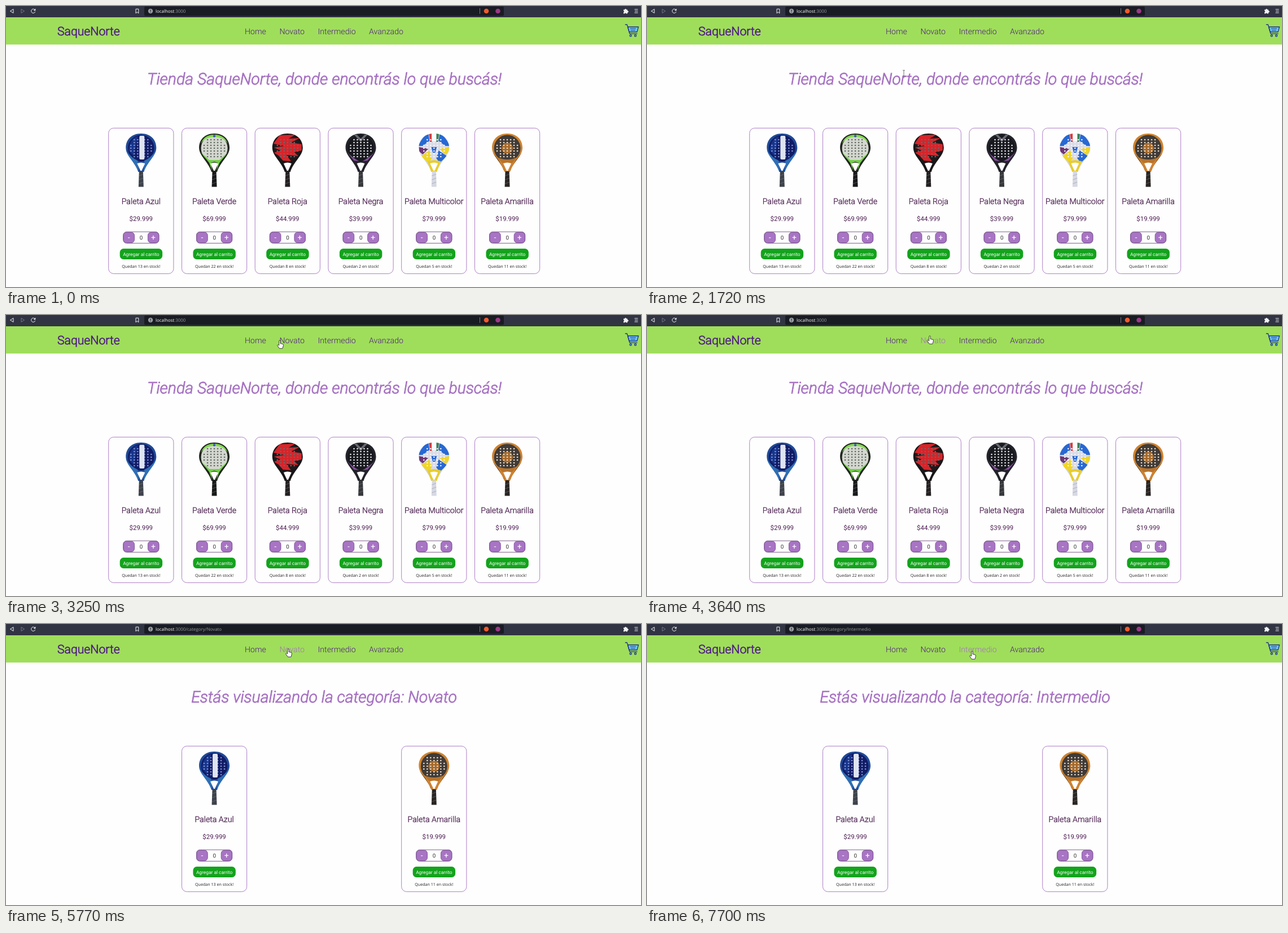
Recreate the animation shown at these times as an HTML page. Size 1125 by 498 pixels, loop 8 s.

```html
<!DOCTYPE html>
<html lang="es">
<head>
<meta charset="utf-8">
<title>Tienda</title>
<style>
html, body { margin: 0; width: 100%; height: 100%; overflow: hidden; background: #fefefe; }
svg { display: block; width: 1125px; height: 498px; font-family: Roboto, sans-serif; text-rendering: geometricPrecision; }
.mid { text-anchor: middle; }
.url { font: 7.9px "Open Sans", "Noto Sans", sans-serif; fill: #9a9ca3; }
.url tspan { fill: #fff; }
.logo { font-size: 21.2px; font-weight: 300; fill: #4f1a86; stroke: #4f1a86; stroke-width: .7; }
.nav { font-size: 14.2px; font-weight: 300; fill: #4f1a86; }
.title { font-size: 28.4px; font-weight: 300; font-style: italic; fill: #a671c2; stroke: #a671c2; stroke-width: .85; }
.name { font-size: 14.2px; font-weight: 300; fill: #441748; stroke: #441748; stroke-width: .3; }
.price { font-size: 11.4px; fill: #4b1b50; }
.qty { font-size: 9.8px; fill: #333; }
.sign { font-size: 14px; fill: #fff; }
.add { font-size: 8.4px; fill: #fff; }
.stock { font: 7.15px "Open Sans", "Noto Sans", sans-serif; fill: #222; }

.anim { animation: 8s step-end -1ms infinite; }
.home { animation-name: home; }
.novice { animation-name: novice; }
.middle { animation-name: middle; }
.all { animation-name: all; }
.few { animation-name: few; }
.hoverNovice { animation-name: hoverNovice; }
.hoverMiddle { animation-name: hoverMiddle; }
.cursor { animation-name: move; }
.arrow { animation-name: arrow; }
.beam { animation-name: beam; }
.hand { animation-name: hand; }

@keyframes home { 0% { opacity: 1 } 47.25%, 100% { opacity: 0 } }
@keyframes novice { 0% { opacity: 0 } 47.25% { opacity: 1 } 94.625%, 100% { opacity: 0 } }
@keyframes middle { 0% { opacity: 0 } 94.625%, 100% { opacity: 1 } }
@keyframes all { 0% { opacity: 1 } 72.125%, 100% { opacity: 0 } }
@keyframes few { 0% { opacity: 0 } 72.125%, 100% { opacity: 1 } }
@keyframes hoverNovice { 0% { fill: #4f1a86 } 41.46% { fill: #a671c2 } 81.325%, 100% { fill: #4f1a86 } }
@keyframes hoverMiddle { 0% { fill: #4f1a86 } 83.025%, 100% { fill: #a671c2 } }
@keyframes move {
  0% { transform: translate(989px, 443px) }
  6.5% { transform: translate(989px, 443px); animation-timing-function: steps(3) }
  9% { transform: translate(624px, 277px) }
  12.375% { transform: translate(602px, 258px); animation-timing-function: steps(7) }
  18.25% { transform: translate(449px, 126px) }
  21.5% { transform: translate(455px, 119px); animation-timing-function: steps(8) }
  28.25% { transform: translate(428px, 39px) }
  38.125% { transform: translate(440px, 43px); animation-timing-function: steps(3) }
  40.625% { transform: translate(485px, 45px); animation-timing-function: steps(3) }
  43.125% { transform: translate(496px, 39px) }
  45.5% { transform: translate(501px, 37px) }
  47.25% { transform: translate(500px, 44px) }
  79.625% { transform: translate(512px, 46px); animation-timing-function: steps(5) }
  83.875%, 100% { transform: translate(576px, 48px) }
}
@keyframes arrow {
  0%, 17.4125%, 27.4%, 40.625%, 83.025%, 100% { opacity: 0 }
  6.5%, 23.1875%, 39.79%, 81.325% { opacity: 1 }
}
@keyframes beam { 0%, 23.1875%, 100% { opacity: 0 } 17.4125% { opacity: 1 } }
@keyframes hand {
  0%, 39.79%, 81.325% { opacity: 0 }
  27.4%, 40.625%, 83.025%, 100% { opacity: 1 }
}
</style>
</head>
<body>
<svg viewBox="0 0 1125 498">
  <defs>
    <path id="head" d="M0 0C17 0 27 11 27 25C27 40 11 49 5 68H-5C-11 49-27 40-27 25C-27 11-17 0 0 0Z"/>
    <clipPath id="inside"><use href="#head"/></clipPath>
  </defs>
  <rect width="1125" height="498" fill="#fefefe"/>

  <!-- browser bar -->
  <rect width="1125" height="20" fill="#313442"/>
  <rect x="245" y="1" width="637" height="16.5" rx="2" fill="#191c23"/>
  <g fill="none" stroke="#f2f2f5" stroke-width="1">
    <path d="M13 5.5V12.5L7.5 9Z"/>
    <path d="M27 5.5V12.5L32.5 9Z" stroke="#747784"/>
    <path d="M51 6.6A3.6 3.6 0 1 0 51.7 10"/>
    <path d="M230 5.3H234.8V13L232.4 10.8L230 13Z"/>
    <path d="M1113.5 6H1119.5M1114 9H1119.5M1113.5 12H1119.5"/>
    <path d="M839.5 4V14" stroke="#777a84"/>
  </g>
  <path d="M52.3 4.6V8.2H48.7Z" fill="#f2f2f5"/>
  <circle cx="256" cy="9" r="4.2" fill="#9c9ea6"/>
  <path d="M256 6.5V9.5M256 10.5V11.7" stroke="#191c23" stroke-width="1.1"/>
  <circle cx="851" cy="9" r="4.3" fill="#f2592a"/>
  <circle cx="871.5" cy="9" r="4.3" fill="#9b3a86"/>
  <path d="M1094 6.5H1096.2A1.4 1.4 0 1 1 1099 6.5H1101V8.7A1.4 1.4 0 1 1 1101 11.4V13.5H1098.7A1.4 1.4 0 0 0 1096 13.5H1094V11.2A1.4 1.4 0 0 0 1094 8.5Z" fill="#f2f2f5"/>
  <g class="url">
    <text class="anim home" x="265" y="12"><tspan>localhost</tspan>:3000</text>
    <text class="anim novice" x="265" y="12"><tspan>localhost</tspan>:3000/category/Novato</text>
    <text class="anim middle" x="265" y="12"><tspan>localhost</tspan>:3000/category/Intermedio</text>
  </g>

  <!-- site header -->
  <rect y="20" width="1125" height="48.3" fill="#9fde5a"/>
  <text class="logo" x="91" y="52">SaqueNorte</text>
  <g class="nav">
    <text x="422.9" y="49.5">Home</text>
    <text class="anim hoverNovice" x="484.4" y="49.5">Novato</text>
    <text class="anim hoverMiddle" x="552.5" y="49.5">Intermedio</text>
    <text x="643" y="49.5">Avanzado</text>
  </g>
  <g stroke="#1d3585" stroke-width="1.3" stroke-linejoin="round" stroke-linecap="round">
    <path d="M1101.5 37H1120.5L1118 46H1104Z" fill="#6cc4f5"/>
    <path d="M1097.3 33H1100.3L1105 49.2H1118" fill="none"/>
    <path d="M1106 40H1115.5M1107 43H1114.5" stroke-width="1"/>
    <circle cx="1106.7" cy="52.5" r="1.6" fill="#6cc4f5"/>
    <circle cx="1115" cy="52.5" r="1.6" fill="#6cc4f5"/>
  </g>

  <g class="title mid">
    <text class="anim home" x="564" y="138.5">Tienda SaqueNorte, donde encontrás lo que buscás!</text>
    <text class="anim novice" x="563.5" y="138.5">Estás visualizando la categoría: Novato</text>
    <text class="anim middle" x="563.5" y="138.5">Estás visualizando la categoría: Intermedio</text>
  </g>

  <g id="all" class="anim all"></g>
  <g id="few" class="anim few"></g>

  <g class="anim cursor">
    <path class="anim arrow" d="M0 0V14L3.2 11L5.4 16L7.5 15L5.4 10.3H9.8Z" fill="#fff" stroke="#111" stroke-width=".8"/>
    <path class="anim beam" d="M-2-5H2M0-5V5M-2 5H2" fill="none" stroke="#555" stroke-width=".8"/>
    <path class="anim hand" d="M-1.3 8V1.2A1.2 1.2 0 0 1 1.1 1.2V5.5L5 6.3Q6.6 6.7 6.4 8.4L5.7 12L4.8 14.3H-.6L-4 9.6Q-4.8 8.3-3.6 7.8Q-2.7 7.6-1.3 9Z" fill="#fff" stroke="#111" stroke-width=".8"/>
  </g>
</svg>
<script>
const shape = (d, fill) => `<path d="${d}" fill="${fill}"/>`;

// art lies under the holes, mark over them
const products = [
  { name: 'Azul', price: '29.999', stock: 13, rim: '#204a97', face: '#121c66', hole: '#7f93d0', grip: '#3d424b',
    art: shape('M-27 30Q-16 44-6 48L-4 66L-16 56Z', '#2f6fb5') + shape('M27 30Q16 44 6 48L4 66L16 56Z', '#2f6fb5')
      + shape('M-22 30Q-20 9-6 5L-13 40Z', '#17358c'),
    mark: '<rect x="-3" y="4" width="9" height="42" rx="2" fill="#dfe4f1"/>' },
  { name: 'Verde', price: '69.999', stock: 22, rim: '#20251f', face: '#d3d7cf', hole: '#626b62', grip: '#17191a',
    art: shape('M-24 18Q-18 2 0 2Q18 2 24 18Q16 6 0 6Q-16 6-24 18Z', '#7fd94c')
      + shape('M-24 33L-9 52L-4 66L-6 52L0 50L6 52L4 66L9 52L24 33L9 47H-9Z', '#72cf45'),
    mark: '<circle cy="4.5" r="2.2" fill="#3b55b8"/>' },
  { name: 'Roja', price: '44.999', stock: 8, rim: '#191719', face: '#1e1b1d', hole: '#7d6163', grip: '#242022',
    art: shape('M-25 18L-14 3L14 2L2 9L22 8L6 16L25 19L25 30L12 33L19 40L-2 38L6 49L-8 48L-16 39L-24 34L-12 30L-24 25L-6 22Z', '#d6242a') },
  { name: 'Negra', price: '39.999', stock: 2, rim: '#23232b', face: '#18191e', hole: '#e8e8ec', grip: '#36373b',
    art: shape('M-25 32Q-15 43-3 49L-12 48Z', '#8851a0') + shape('M25 32Q15 43 3 49L12 48Z', '#8851a0')
      + shape('M-12 2L0 15L12 2L7 2L0 9L-7 2Z', '#686a72') },
  { name: 'Multicolor', price: '79.999', stock: 5, rim: '#cfd3e2', face: '#d9dbe6', hole: '#f6f6fa', grip: '#d6d8e3',
    art: shape('M-28 22Q-20 4-10 0L-8 13L-20 22Z', '#2868d3') + shape('M28 22Q20 4 10 0L8 13L20 22Z', '#2868d3')
      + shape('M-9 0H-4V15H-7Z', '#d93a38') + shape('M9 0H4V15H7Z', '#387f55') + shape('M-4 0H4V14H-4Z', '#fafafc')
      + shape('M-27 24L-10 27L-20 37L-26 32Z', '#6d3775') + shape('M27 24L10 27L20 38L26 32Z', '#f0d527')
      + shape('M-23 40L-8 30L-4 44L-10 52Z', '#f0d527') + shape('M23 40L8 30L4 44L10 52Z', '#2868d3')
      + shape('M-5 24H5L2 34H-2Z', '#2868d3') + shape('M-12 49L0 47L12 49L5 68H-5Z', '#e8cd2d') },
  { name: 'Amarilla', price: '19.999', stock: 11, rim: '#cf8330', face: '#403b38', hole: '#e9ddcc', grip: '#292523',
    art: '<circle cy="26" r="10" fill="#a66a2c"/>' + shape('M-18 42Q0 50 18 42L9 52H-9Z', '#b8742c')
      + shape('M-27 32L-15 48L-5 66L-10 62L-26 42Z', '#4a3826') + shape('M27 32L15 48L5 66L10 62L26 42Z', '#4a3826') }
];

function holes(color) {
  let dots = '';
  for (let y = 11; y <= 41; y += 5)
    for (let x = -18; x <= 18; x += 6)
      if (Math.hypot(x, y - 26) < 19.5) dots += `<circle cx="${x}" cy="${y}" r="1.35" fill="${color}"/>`;
  return dots;
}

const racket = p => `<g transform="translate(0 226)">
  <use href="#head" fill="${p.rim}"/>
  <ellipse cy="26" rx="23.5" ry="23.5" fill="${p.face}"/>
  <g clip-path="url(#inside)">${p.art}</g>${holes(p.hole)}${p.mark || ''}
  <path d="M-7 53Q0 50 7 53L1 66H-1Z" fill="#fefefe"/>
  <path d="M-3.5 67H3.5L4.5 94.5H-4.5Z" fill="${p.grip}"/>
  <path d="M-4 75L4 72M-4 82L4 79M-4 89L4 86" stroke="#888" stroke-width=".5"/>
</g>`;

const stepButton = (x, sign) => `<rect x="${x - 9.7}" y="401" width="19.4" height="18.6" rx="5.5" fill="#a874c4" stroke="#74458f" stroke-width=".8"/>
  <text class="sign" x="${x}" y="415">${sign}</text>`;

const card = (p, slot) => `<g class="mid" transform="translate(${239.3 + slot * 129.75} 0)">
  <rect x="-57.6" y="216.4" width="115.2" height="258" rx="9" fill="#fefefe" stroke="#a671c2" stroke-width=".9"/>
  ${racket(p)}
  <text class="name" y="350.5">Paleta ${p.name}</text>
  <text class="price" y="381">$${p.price}</text>
  <rect x="-31.6" y="400.2" width="63.2" height="20.2" rx="6" fill="#fefefe" stroke="#6f5180" stroke-width=".9"/>
  ${stepButton(-21.5, '-')}${stepButton(21.8, '+')}
  <text class="qty" x=".3" y="414.3">0</text>
  <rect x="-37.6" y="430" width="75.4" height="19" rx="6.5" fill="#13a31c"/>
  <text class="add" y="442.6">Agregar al carrito</text>
  <text class="stock" y="464.3">Quedan ${p.stock} en stock!</text>
</g>`;

document.getElementById('all').innerHTML = products.map(card).join('');
document.getElementById('few').innerHTML = card(products[0], 1) + card(products[5], 4);
</script>
</body>
</html>
```
